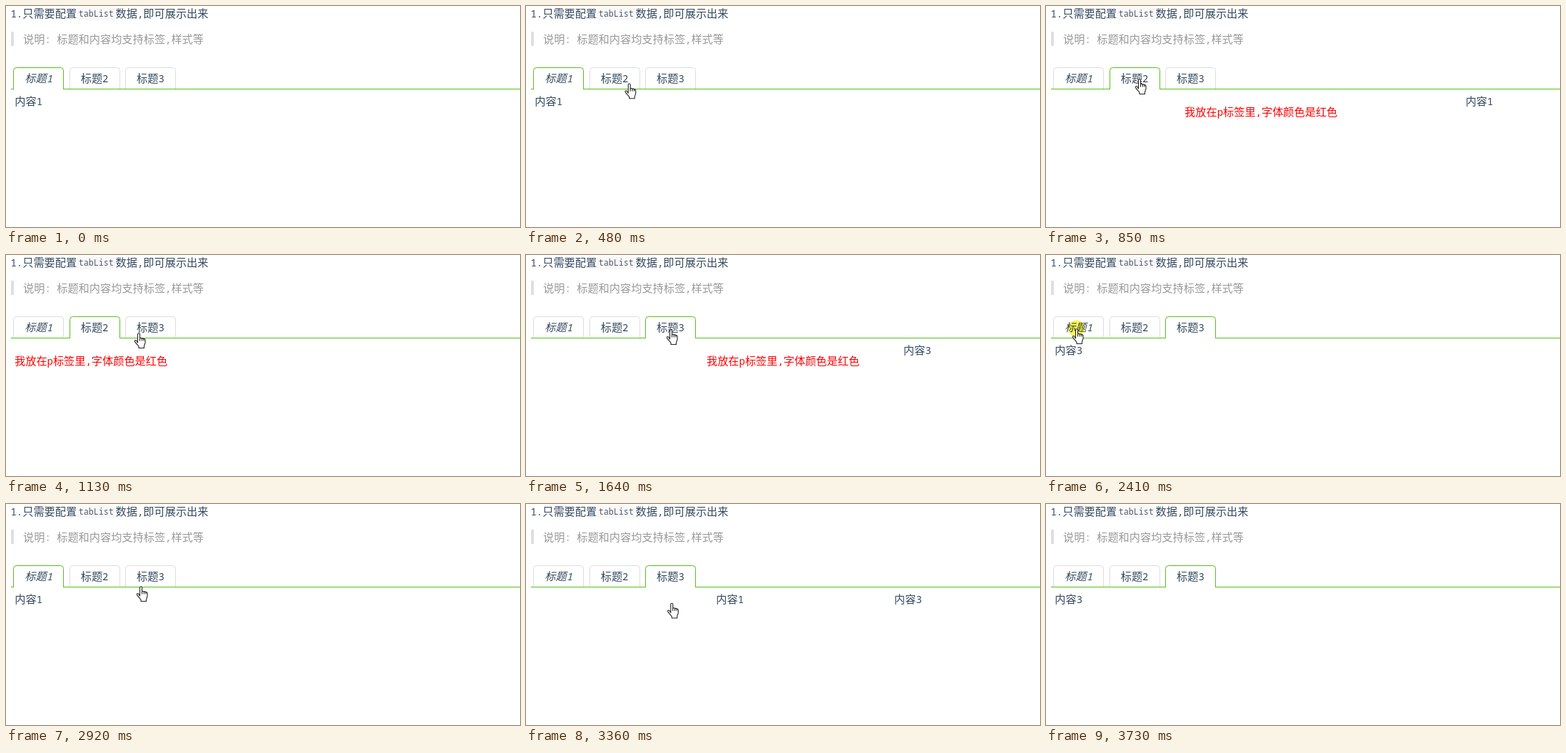
Write an HTML page that moves like this. It is 720x310 px and loops after 4.11 s.

```html
<!DOCTYPE html>
<html lang="zh-CN">
<head>
<meta charset="utf-8">
<title>Tabs</title>
<style>
  html, body { margin: 0; width: 100%; height: 100%; overflow: hidden; background: #fff; }
  svg { display: block; width: 720px; height: 310px; }
  text { font: 15.2px "Noto Sans CJK SC", "Noto Sans CJK", "Noto Sans SC", sans-serif; fill: #34495e; white-space: pre; }
  .m { font-family: "Noto Sans Mono", monospace; font-size: 13.93px; }
  .code { font-size: 11.7px; fill: #525c68; }
  .note { fill: #999; }
  .red { fill: #f00; }
  .tab:first-child text { font-style: italic; }
  .tab path { fill: #fff; stroke: #ddd; }
  .tab.on path, #line { stroke: #56c01b; }
  #glow { fill: #fbf23c; opacity: .85; mix-blend-mode: multiply; }
</style>
</head>
<body>
<svg viewBox="0 0 720 310">
  <rect x="99" y="2" width="54" height="18" rx="2" fill="#f8f8f8"/>
  <text x="6.5" y="16"><tspan class="m">1.</tspan>只需要配置</text>
  <text class="m code" x="101.8" y="15">tabList</text>
  <text x="153.6" y="16">数据<tspan class="m">,</tspan>即可展示出来</text>

  <rect x="7" y="36" width="4" height="20" fill="#dfdfdf"/>
  <text class="note" x="24.1" y="52">说明<tspan class="m">: </tspan>标题和内容均支持标签<tspan class="m">,</tspan>样式等</text>

  <path id="line" d="M7 116.5H720"/>
  <g id="tabs"></g>

  <text class="pane" x="12.3" y="139">内容<tspan class="m">1</tspan></text>
  <text class="pane red" x="12" y="154">我放在<tspan class="m">p</tspan>标签里<tspan class="m">,</tspan>字体颜色是红色</text>
  <text class="pane" x="12.3" y="139">内容<tspan class="m">3</tspan></text>

  <circle id="glow" r="11.5"/>
  <g id="hand" stroke="#222" stroke-width="1.1" stroke-linejoin="round" stroke-linecap="round">
    <path fill="#fff" d="M5 14V2.2a1.5 1.5 0 0 1 3 0V8c.2-1.2 2.6-1 2.8.4 .3-.9 2.4-.7 2.6.6 .5-.7 2.1-.3 2.1 1.2V14c0 2-1.6 3.6-1.6 5.5v2H6.5v-2C5.5 17.5 2 14.5.9 12.2c-.6-1.4 1.2-2.2 2.2-1.2z"/>
    <path fill="none" d="M8 8v3M10.8 8.4V11M13.4 9v2"/>
  </g>
</svg>
<script>
const LOOP = 4110, WIDTH = 757.5, SLIDE = 400, PRESS = 70, PITCH = 78.4;

const picks = [
  { at: 667, from: 0, to: 1 },
  { at: 1557, from: 1, to: 2 },
  { at: 2475, from: 2, to: 0 },
  { at: 3274, from: 0, to: 2 },
];

// Pointer stops: time, x, y
const stops = [
  [60, 454, 253], [540, 124.5, 102], [940, 124.5, 102], [1130, 179.5, 109],
  [1500, 196.5, 104], [1750, 196.5, 104], [2250, 36.5, 103], [2480, 36.5, 103],
  [2920, 182.5, 115], [3270, 196.5, 106], [3620, 204, 300],
];

const $ = id => document.getElementById(id);
const move = (el, x, y) => el.setAttribute('transform', `translate(${x} ${y})`);
const show = (el, on) => { el.style.display = on ? '' : 'none'; };

$('tabs').innerHTML = [0, 1, 2].map(i => {
  const left = Math.round(10.4 + i * PITCH) + .5;
  return `<g class="tab">
    <path d="M${left} 117V90.5a4 4 0 0 1 4-4h62a4 4 0 0 1 4 4V117"/>
    <text x="${26.3 + i * PITCH}" y="107">标题<tspan class="m">${i + 1}</tspan></text></g>`;
}).join('');
const tabs = [...document.querySelectorAll('.tab')];
const panes = [...document.querySelectorAll('.pane')];

// The CSS "ease" curve
function ease(x) {
  if (x >= 1) return 1;
  const curve = (a, b, s) => 3 * (1 - s) ** 2 * s * a + 3 * (1 - s) * s * s * b + s ** 3;
  let lo = 0, hi = 1;
  for (let i = 0; i < 24; i++) {
    const mid = (lo + hi) / 2;
    if (curve(.25, .25, mid) < x) lo = mid; else hi = mid;
  }
  return curve(.1, 1, lo);
}

function pointer(t) {
  const i = stops.findIndex(s => s[0] > t);
  const [t0, x0, y0] = stops[i - 1], [t1, x1, y1] = stops[i];
  const u = (t - t0) / (t1 - t0), k = u * u * (3 - 2 * u);
  return [x0 + (x1 - x0) * k, y0 + (y1 - y0) * k];
}

function draw(t) {
  const { at, from, to } = picks.filter(p => p.at <= t).pop() || { at: -SLIDE, from: 2, to: 0 };
  const p = ease((t - at) / SLIDE);

  // The green line covers every tab's foot except the selected one's
  tabs.forEach((tab, i) => tab.classList.toggle('on', i === to));
  $('tabs').before(...tabs.length ? [$('line')] : []);
  const left = Math.round(10.4 + to * PITCH);
  $('line').setAttribute('d', `M7 116.5H${left + 1}M${left + 70} 116.5H720`);
  $('tabs').after($('line'));

  panes.forEach((pane, i) => {
    show(pane, i === to || (i === from && p < 1));
    move(pane, WIDTH * (i === to ? 1 - p : p), 0);
  });

  const visible = t >= 60 && t < 3600;
  show($('hand'), visible);
  show($('glow'), picks.some(({ at }) => t >= at - PRESS && t < at));
  if (visible) {
    const [x, y] = pointer(t);
    move($('hand'), x, y);
    move($('glow'), x + 6, y);
  }
}

const origin = performance.now();
function loop() {
  draw((performance.now() - origin) % LOOP);
  requestAnimationFrame(loop);
}
loop();
</script>
</body>
</html>
```
